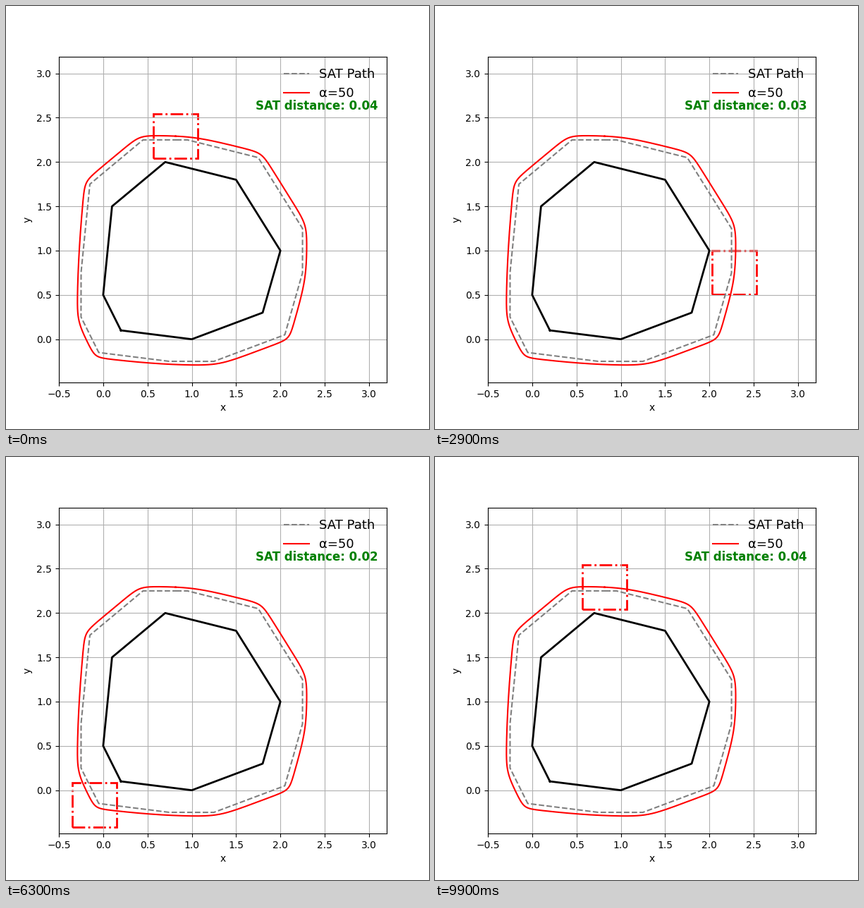
A matplotlib script that plays this animation: 600x600 px, repeating every 10 s.

```python
import numpy as np
import matplotlib.pyplot as plt
from matplotlib.animation import FuncAnimation
from matplotlib.patches import Rectangle

FRAMES = 100
HALF = 0.25          # half side of the moving box
SHARPNESS = 30       # softness of the rounded corners
LEVEL = 6.6
BOX_WEIGHT = 1.5

poly = np.array([(0.2, 0.1), (1, 0), (1.8, 0.3), (2, 1), (1.5, 1.8),
                 (0.7, 2), (0.1, 1.5), (0, 0.5)])

# Separating axes: polygon edge normals, then the four box sides.
edges = np.roll(poly, -1, axis=0) - poly
lengths = np.hypot(*edges.T)
edge_normals = np.column_stack([edges[:, 1], -edges[:, 0]]) / lengths[:, None]
normals = np.vstack([edge_normals, np.eye(2), -np.eye(2)])
reach = (normals @ poly.T).max(axis=1) + HALF * np.abs(normals).sum(axis=1)
weights = np.repeat([1, BOX_WEIGHT], [len(poly), 4])
scale = np.append(lengths, np.ones(4))


def separations(points):
    return points @ normals.T - reach


def hard_gap(points):
    return separations(points).max(axis=1)


def smooth_gap(points):
    return np.log(np.exp(SHARPNESS * separations(points)) @ weights / LEVEL)


def contour(gap, n=2400):
    """Zero level of gap, clockwise from the top, by bisection along rays."""
    start = np.arctan2(1.295, -0.183)
    angle = start - np.linspace(0, 2 * np.pi, n)
    rays = np.column_stack([np.cos(angle), np.sin(angle)])
    lo, hi = np.full(n, 0.5), np.full(n, 2.5)
    for _ in range(40):
        mid = (lo + hi) / 2
        inside = gap(1 + rays * mid[:, None]) < 0
        lo, hi = np.where(inside, mid, lo), np.where(inside, hi, mid)
    return 1 + rays * lo[:, None]


track = contour(smooth_gap)
# The box advances evenly in |dx| + |dy|.
travel = np.append(0, np.cumsum(np.abs(np.diff(track, axis=0)).sum(axis=1)))
stops = np.linspace(0, travel[-1], FRAMES)
centers = np.column_stack([np.interp(stops, travel, c) for c in track.T])
distances = (separations(centers) * scale).max(axis=1)

fig = plt.figure(figsize=(6, 6), dpi=100)
ax = fig.add_axes([0.125, 0.11, 0.775, 0.77])
y_span = 3.7 * 462 / 465
ax.set(xlim=(-0.5, 3.2), ylim=(1.35 - y_span / 2, 1.35 + y_span / 2),
       xlabel="x", ylabel="y")
ticks = np.arange(-0.5, 3.1, 0.5)
ax.set_xticks(ticks)
ax.set_yticks(ticks[1:])
ax.grid(True)

ax.plot(*np.vstack([poly, poly[:1]]).T, color="black", lw=2)
ax.plot(*contour(hard_gap).T, color="gray", ls="--", lw=1.5, label="SAT Path")
ax.plot(*track.T, color="red", lw=1.5, label="α=50")
ax.legend(loc="upper right", fontsize=13, frameon=False)

box = Rectangle((0, 0), 2 * HALF, 2 * HALF, fill=False, ec="red", ls="-.", lw=2)
ax.add_patch(box)
label = ax.text(3.1, 2.59, "", ha="right", color="green", fontsize=12,
                weight="bold")


def update(i):
    box.set_xy(centers[i] - HALF)
    label.set_text(f"SAT distance: {distances[i]:.2f}")
    return box, label


anim = FuncAnimation(fig, update, frames=FRAMES, interval=100,
                     repeat=True, repeat_delay=0)
plt.show()
```
